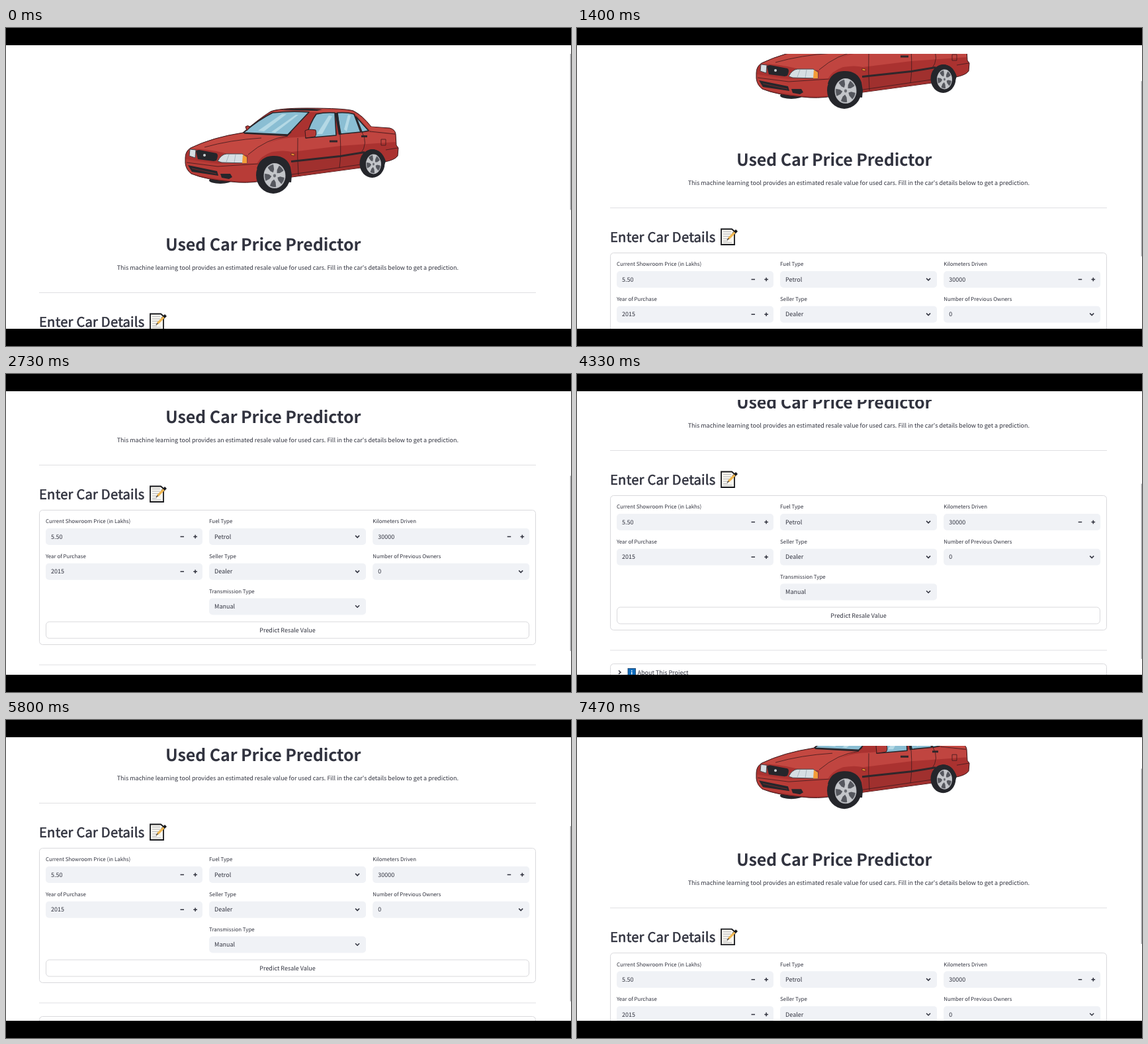
An HTML page for the animation above (8000 ms loop, 854x480 px).

```html
<!DOCTYPE html>
<html lang="en">
<head>
<meta charset="utf-8">
<title>Used Car Price Predictor</title>
<style>
html, body { margin: 0; width: 100%; height: 100%; overflow: hidden; background: #000; }
svg { display: block; width: 100vw; height: 100vh; }
text { font: 9.01px "Noto Sans CJK JP", "Noto Sans CJK SC", "Noto Sans CJK", "Open Sans", sans-serif; fill: #31333f; text-rendering: geometricPrecision; }
.title { font-size: 25.05px; font-weight: 700; letter-spacing: -.005em; }
.heading { font-size: 20.14px; letter-spacing: .25px; stroke: #31333f; stroke-width: .6px; }
.label { font-size: 7.93px; }
.field { fill: #f0f2f6; }
.frame { fill: none; stroke: #d9d9dc; }
.icon { fill: none; stroke: #31333f; stroke-width: 1.5; }
.ink { fill: #25262b; }
.line { fill: none; stroke: #3a1a1d; stroke-width: .8; }
.glass { fill: #8abed3; stroke: #25262b; stroke-width: 1.6; }
.shine { fill: #b4d9e5; }
</style>
</head>
<body>
<svg viewBox="0 0 854 480" xmlns="http://www.w3.org/2000/svg">
  <defs><clipPath id="view"><rect y="39" width="854" height="415"/></clipPath></defs>
  <rect width="854" height="480"/>
  <rect y="26" width="854" height="428" fill="#fff"/>
  <g clip-path="url(#view)">
    <g id="page">
      <g id="car" stroke-linejoin="round">
        <ellipse class="ink" cx="324" cy="230" rx="17" ry="5"/>
        <path d="M271 196 Q271 186 279 181 Q312 165 358 158 Q381 138 400 126 Q412 121 455 121 Q512 121 525 125 Q539 132 552 149 L580 151 Q588 153 589 160 L590 177 L593 181 L592 193 Q588 199 573 202 L536 211 L432 225 L386 231 Q364 235 340 232 Q302 229 280 220 Q272 214 271 204 Z" fill="#aa3230" stroke="#3a1a1d"/>
        <path d="M279 182 Q312 166 358 159 L428 163 Q404 166 366 192 L332 189 Q302 182 279 182Z" fill="#c44841"/>
        <path d="M404 127 Q412 122 455 122 Q512 122 524 126 Q538 133 551 149 L580 152 Q588 154 588 160 L552 157 L527 129 L462 127Z" fill="#c44841"/>
        <path d="M366 192 Q400 165 440 165 L548 157 L588 161 L589 172 L505 178 L432 187 Q420 184 402 187 Q385 193 379 205 L364 204Z" fill="#c04540"/>
        <path d="M432 203 L542 190 L535 211 L432 225Z" fill="#a0302e"/>
        <path d="M272 198 L320 205 L381 204 L378 230 Q343 234 282 220 Q272 214 272 204Z" fill="#b83c37"/>
        <path class="ink" d="M413 124 Q442 120 478 123 L470 125Z"/>
        <path class="glass" d="M359 158 Q382 138 403 128 Q430 125 458 127 L426 161Z"/>
        <path class="shine" d="M381 155 L417 130 L424 130 L390 156Z M401 157 L438 131 L442 131 L407 158Z"/>
        <path class="glass" d="M453 166 Q460 142 469 130 Q482 127 497 128 L499 162Z M501 128 Q516 127 526 130 L536 157 L505 160Z M529 134 L548 155 L538 157Z"/>
        <path class="shine" d="M470 160 L488 132 L493 133 L478 160Z M511 153 L517 131 L521 132 L515 156Z"/>
        <path d="M499 128 L505 161" stroke="#25262b" stroke-width="4"/>
        <path d="M360 159 L425 162.500 L431 157" fill="none" stroke="#25262b" stroke-width="1.6"/>
        <path d="M452 155 Q457 152 468 154 Q470 161 467 164 L453 166Z M362 149 Q365 146 369 149 L364 155Z" fill="#b43a36" stroke="#3a1a1d"/>
        <path class="line" d="M441 166 Q440 196 442 222 M505 161 Q507 190 504 211 M538 157 Q548 174 536 190 M550 156 L588 160 M426 163 Q394 167 366 191 M300 180 Q338 169 386 166 M567 168 h7 v9 h-7z M273 203 L320 209 L381 205 M432 221 L536 206 M574 184 L592 181"/>
        <path d="M431 201.500 L505 193.500 L542 187.500" fill="none" stroke="#30272b" stroke-width="3"/>
        <path d="M489 171 h12 M537 163.500 h9" stroke="#30272b" stroke-width="3"/>
        <path d="M431 189 l5 1 v3 l-5 -1z" fill="#ed8b32" stroke="#3a1a1d" stroke-width=".6"/>
        <path d="M278 183 L287 184 L286 196 L277 193Z M320 201 Q325 191 333 190 L357 190 L364 195 L364 204 L326 203Z" fill="#d6dee3" stroke="#46474c"/>
        <path d="M337 191 L333 202 M347 191 L345 203" stroke="#a9b5bd"/>
        <path d="M358 191 L364 195 V204 L357 204Z" fill="#f39b38"/>
        <path class="ink" d="M287 186 Q288 184 292 184 L318 189 Q322 191 318 200 L314 201 L290 198Z M275 207 L319 216 L321 223 L281 217Z M324 220 L339 220 L342 225 L337 228 L326 226Z"/>
        <path d="M281 212 l37 8" stroke="#6f2b2c"/>
        <circle cx="300" cy="192" r="2" fill="#cbd0d3"/>
        <path class="ink" d="M379 212 Q384 194 403 193 Q424 192 430 210 L432 222 L431 233 L422 232Z M535 208 Q536 186 553 183 Q568 183 574 201 L570 212 L563 212Z"/>
      </g>
      <text class="title" x="241" y="336">Used Car Price Predictor</text>
      <text x="167.700" y="364.800">This machine learning tool provides an estimated resale value for used cars. Fill in the car's details below to get a prediction.</text>
      <path d="M50 399.500 H801 M50 701 H801" stroke="#e0e0e3"/>
      <text class="heading" x="50" y="450.500">Enter Car Details</text>
      <g id="memo">
        <path d="M218 431.500 H234 L238 435 V455 H218Z" fill="#f8f6f0" stroke="#17181c" stroke-width="1.800"/>
        <path d="M221 435.500 h12 M221 439 h12 M221 442.500 h10 M221 446 h7 M221 449.500 h7 M221 452 h13" stroke="#b4b5b8"/>
        <path d="M241.500 433.500 L236 439" stroke="#17181c" stroke-width="4"/>
        <path d="M238.500 436.500 L229 446" stroke="#eeb650" stroke-width="3.200"/>
        <path d="M229.500 445.500 L227 448" stroke="#4a4038" stroke-width="1.600"/>
      </g>
      <rect class="frame" x="50.500" y="467.500" width="750" height="203" rx="5"/>
      <g id="form"></g>
      <rect class="frame" x="60.500" y="636" width="730" height="25" rx="5"/>
      <text x="383.300" y="651.700">Predict Resale Value</text>
      <rect class="frame" x="50.500" y="721.500" width="750" height="25" rx="5"/>
      <path class="icon" d="M63 731.500 l3 2.700 l-3 2.700"/>
      <rect x="77" y="728.500" width="11.500" height="11.500" fill="#0f6cbd" stroke="#123a63" stroke-width=".8"/>
      <path d="M82.700 731 v1.500 M82.700 733.500 v4" stroke="#fff" stroke-width="1.400"/>
      <text x="91.500" y="737.600">About This Project</text>
    </g>
    <rect id="thumb" x="852.700" width="1.300" height="264.500" fill="#a6a7ab"/>
  </g>
</svg>
<script>
const byId = id => document.getElementById(id);
const LOOP = 8000, FPS = 15;

function wheel(cx, cy, rx, ry, rimX, rimY) {
  const spokes = Array.from({ length: 5 }, (_, i) =>
    `<path d="M-.2 0 L-.14 -.5 L-.3 -.95 H.3 L.14 -.5 L.2 0Z" transform="rotate(${i * 72 + 10})" fill="#c3c5c9"/>`).join('');
  return `<ellipse class="ink" cx="${cx}" cy="${cy}" rx="${rx}" ry="${ry}"/>
    <g transform="translate(${cx + 2} ${cy + 1}) scale(${rimX} ${rimY})">
      <circle r=".95" fill="#55575e" stroke="#b4b6bb" stroke-width=".1"/>${spokes}
      <circle r=".3" fill="#c3c5c9"/>
      <circle r=".13" fill="#6a6c73"/>
    </g>`;
}

function field(column, row, label, value, stepper) {
  const x = 60 + column * 247.1, y = 495 + row * 52.7;
  const right = x + 237, mid = y + 12.5;
  const icon = stepper
    ? `M${right - 33.5} ${mid} h5.500 M${right - 13.7} ${mid} h5.600 M${right - 10.9} ${mid - 2.8} v5.600`
    : `M${right - 16} ${mid - 1.6} l3 3 l3 -3`;
  return `<text class="label" x="${x}" y="${y - 7.6}">${label}</text>
    <rect class="field" x="${x}" y="${y}" width="237" height="25" rx="5"/>
    <text x="${x + 8}" y="${y + 15.7}">${value}</text>
    <path class="icon" d="${icon}"/>`;
}

byId('car').insertAdjacentHTML('beforeend',
  wheel(404, 222, 26, 28, 16.5, 19) + wheel(553.5, 204.5, 19, 21.5, 11.5, 15));

byId('form').innerHTML = [
  [0, 0, 'Current Showroom Price (in Lakhs)', '5.50', true],
  [1, 0, 'Fuel Type', 'Petrol'],
  [2, 0, 'Kilometers Driven', '30000', true],
  [0, 1, 'Year of Purchase', '2015', true],
  [1, 1, 'Seller Type', 'Dealer'],
  [2, 1, 'Number of Previous Owners', '0'],
  [1, 2, 'Transmission Type', 'Manual']
].map(args => field(...args)).join('');

// [tick, scroll offset], interpolated linearly
const scrollKeys = [
  [0, 0], [9, 0], [10, 20], [12, 107.6], [15, 122], [22, 129],
  [29, 141.4], [35, 156], [38, 222], [41, 262],
  [64, 262], [67, 328], [71, 364], [75, 364],
  [76, 363.3], [82, 308], [87, 274], [88, 270],
  [92, 162], [96, 115.8], [120, 115.8]
];

function scrollAt(tick) {
  const next = Math.max(1, scrollKeys.findIndex(([at]) => at >= tick));
  const [t0, s0] = scrollKeys[next - 1], [t1, s1] = scrollKeys[next];
  return s0 + (s1 - s0) * (tick - t0) / (t1 - t0);
}

function draw(ms) {
  const tick = Math.floor(ms % LOOP * FPS / 1000 + 0.06);
  const scroll = scrollAt(tick);
  byId('page').setAttribute('transform', `translate(0 ${-scroll})`);
  byId('thumb').setAttribute('y', 10 + scroll * 0.548);
}

let start;
function loop(now) {
  start ??= now;
  draw(now - start);
  requestAnimationFrame(loop);
}
draw(0);
requestAnimationFrame(loop);
</script>
</body>
</html>
```
